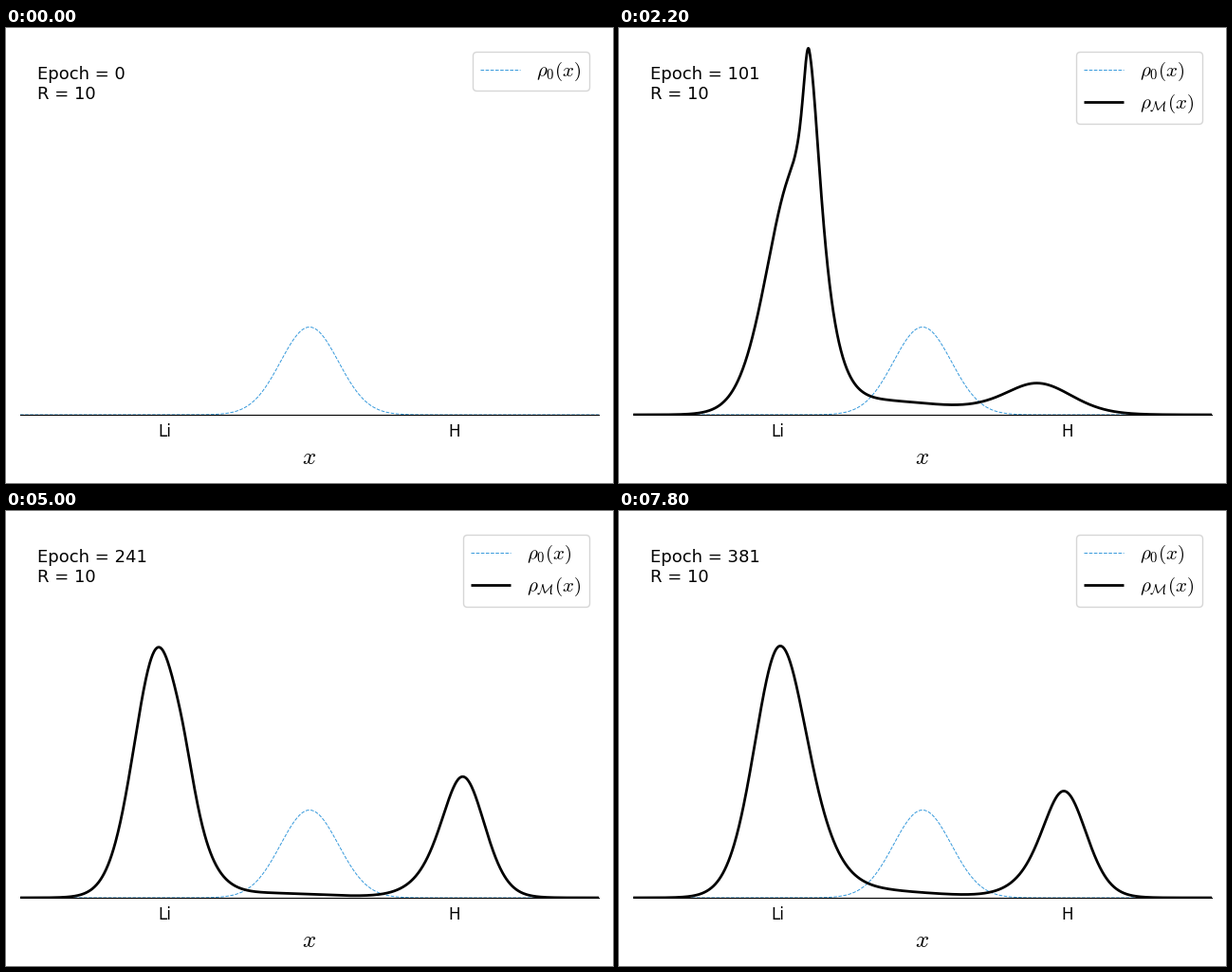
A matplotlib script for the animation above (8 s loop, 640 by 480 pixels).

```python
import numpy as np
import matplotlib.pyplot as plt
from matplotlib.animation import FuncAnimation
from matplotlib.patches import FancyBboxPatch, Rectangle

plt.rcParams["font.family"] = "DejaVu Sans"
plt.rcParams["mathtext.fontset"] = "cm"

W, H, DPI = 640, 480, 100
FRAMES, INTERVAL = 40, 200
LEFT, RIGHT, BASE = 15, 625, 408

# Key points of the training: centre and height of the two atoms' peaks,
# and the height of the cusp that comes and goes beside lithium.
KEYS = [1, 4, 11, 21, 29, 33, 39]
LI_X = [320, 179, 186, 158, 162, 167, 170]
LI_H = [250, 248, 255, 269, 252, 266, 265.5]
H_X = [320, 453, 441, 485, 478, 474, 469]
H_H = [120, 100.5, 33, 159, 96.5, 122.5, 112.5]
CUSP = [0, 0, 173, 0, 64, 0, 0]

x = np.linspace(LEFT, RIGHT, 1221)


def bump(c, h, wl, wr, pl, pr):
    """Two-sided sech**p peak with half widths wl and wr."""
    d = x - c
    w = np.where(d < 0, wl, wr)
    p = np.where(d < 0, pl, pr)
    return h * np.cosh(d * np.arccosh(2 ** (1 / p)) / w) ** -p


def density(i):
    li_x, li_h, h_x, h_h, cusp = (
        np.interp(i, KEYS, row) for row in (LI_X, LI_H, H_X, H_H, CUSP))

    drift = np.clip(li_x - 168, -20, 20)
    lithium = bump(li_x, li_h, 31.5 + 0.2 * drift,
                   35 + 0.3 * drift - 0.068 * cusp, 8, 2)

    gap = 32 - 0.1 * cusp
    spike = bump(li_x + gap, cusp, gap / 2, 10 + gap / 4, 2, 1)

    # a smaller hydrogen peak is broader, and all starts out broad
    half = 23 + 660 / h_h + 15 * np.exp(-i / 4)
    hydrogen = bump(h_x, h_h, half, half - 1, 1.5, 6)

    # charge left between the atoms
    bridge = bump(0.6 * li_x + 0.4 * h_x, 0.09 * (175 - h_h), 50, 65, 12, 12)
    return lithium + spike + hydrogen + bridge


fig = plt.figure(figsize=(W / DPI, H / DPI), dpi=DPI, facecolor="white")
ax = fig.add_axes([0, 0, 1, 1])
ax.set(xlim=(0, W), ylim=(H, 0))
ax.axis("off")

BLUE_STYLE = dict(color="#3498db", lw=0.7, ls="--")
BLACK_STYLE = dict(color="black", lw=2, solid_capstyle="butt")

clip = Rectangle((LEFT, BASE + 0.5), RIGHT - LEFT, -BASE - 0.5,
                 transform=ax.transData)
prior, = ax.plot(x, BASE - 92.5 * np.exp(-((x - 320) / 30.5) ** 2 / 2),
                 **BLUE_STYLE)
model, = ax.plot([], [], **BLACK_STYLE)
for line in (prior, model):
    line.set_clip_path(clip)

ax.plot([LEFT, RIGHT], [BASE, BASE], color="black", lw=0.8, zorder=3)
for pos, name in ((167.5, "Li"), (472.5, "H")):
    ax.text(pos, 431, name, size=12, ha="center", va="baseline")
ax.text(320, 460, "$x$", size=18, ha="center", va="baseline")
status = ax.text(33.3, 75, "", size=13, va="baseline")


def legend(left, bottom, rows):
    box = FancyBboxPatch((left, 25), 615 - left, bottom - 25, snap=True,
                         boxstyle="round,pad=0,rounding_size=4.2",
                         fc="white", ec="0.8", lw=1, alpha=0.8, zorder=4)
    parts = [ax.add_patch(box)]
    for y, label, style in rows:
        parts += ax.plot([left + 8.3, left + 50], [y, y], zorder=5, **style)
        parts.append(ax.text(left + 67.2, y + 7, label, size=15,
                             va="baseline", zorder=5))
    return parts


ROWS = [(44, r"$\rho_0(x)$", BLUE_STYLE),
        (78, r"$\rho_{\mathcal{M}}(x)$", BLACK_STYLE)]
short = legend(492, 66, ROWS[:1])
full = legend(482, 101, ROWS)


def update(i):
    started = i > 0
    epoch = 10 * i - 9 if started else 0
    status.set_text(f"Epoch = {epoch}\nR = 10")
    if started:
        model.set_data(x, BASE - density(i))
    else:
        model.set_data([], [])
    for part in short:
        part.set_visible(not started)
    for part in full:
        part.set_visible(started)
    return [status, model, *short, *full]


anim = FuncAnimation(fig, update, frames=FRAMES, interval=INTERVAL,
                     repeat=True, repeat_delay=0, blit=False)
plt.show()
```
